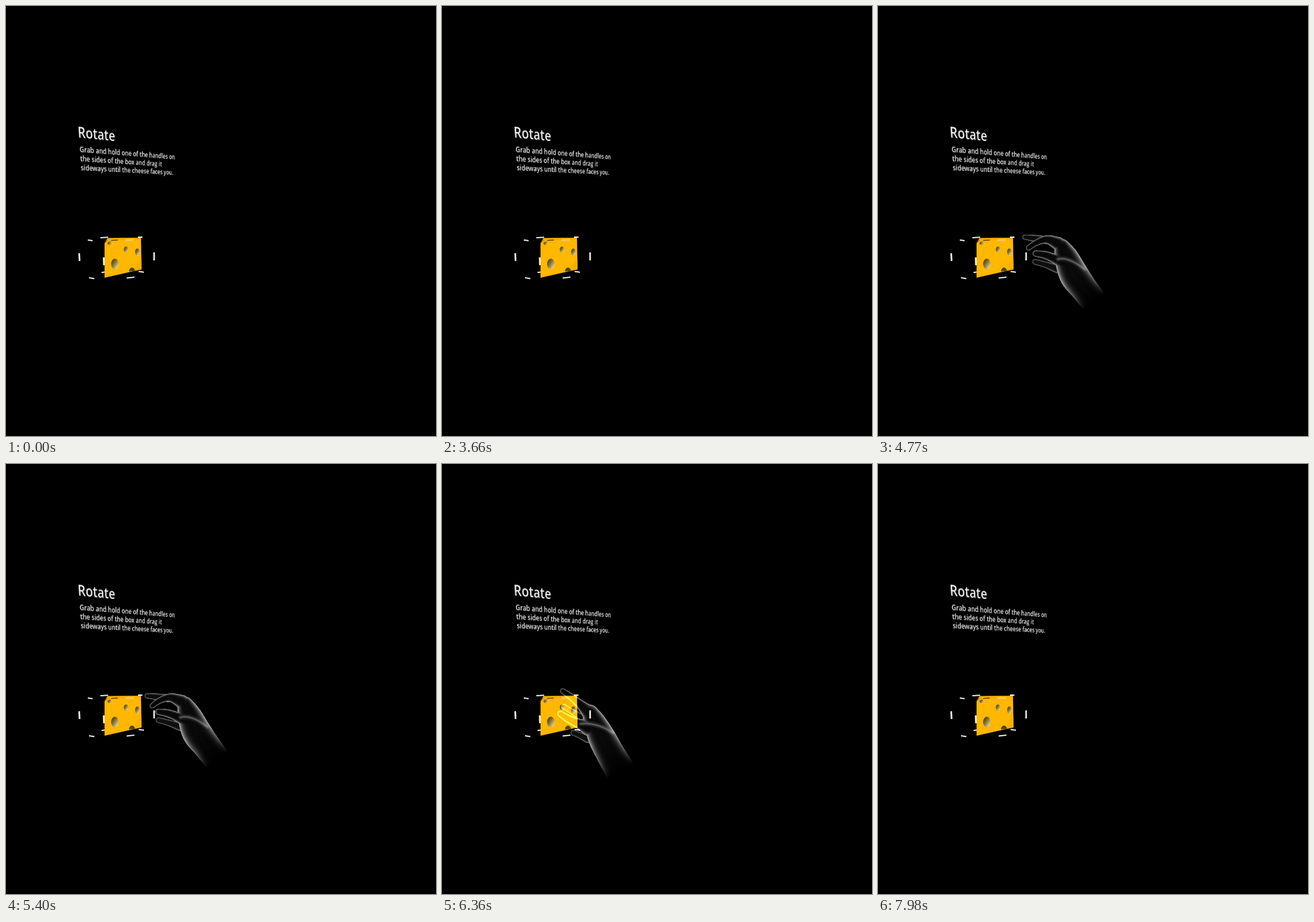
An HTML page with a canvas for the animation above (8 s loop, 720 by 720 pixels).

```html
<!DOCTYPE html>
<html lang="en">
<head>
<meta charset="utf-8">
<title>Rotate</title>
<style>
html, body { margin: 0; width: 100%; height: 100%; overflow: hidden; background: #000; }
canvas, svg { position: absolute; left: 0; top: 0; }
canvas { width: 720px; height: 720px; }
svg { overflow: visible; transform-origin: 0 0; }
text { font: 600 12px "Open Sans", "Noto Sans", sans-serif; fill: #f4f4f4; }
.title { font-size: 23px; }
</style>
</head>
<body>
<canvas id="stage" width="720" height="720"></canvas>
<svg id="panel" width="230" height="110">
  <text class="title" x="8.5" y="37">Rotate</text>
  <text x="10" y="60">Grab and hold one of the handles on</text>
  <text x="10" y="75">the sides of the box and drag it</text>
  <text x="10" y="90">sideways until the cheese faces you.</text>
</svg>
<script>
const LOOP = 8000, STEP = 30;
const ctx = document.getElementById('stage').getContext('2d');

function makeLayer() {
  const c = document.createElement('canvas');
  c.width = c.height = 720;
  return c.getContext('2d');
}

// Maps the rectangle (0,0)-(w,h) onto four corners: TL, TR, BR, BL.
function quadMatrix(w, h, [a, b, c, d]) {
  const sx = a[0] - b[0] + c[0] - d[0], sy = a[1] - b[1] + c[1] - d[1];
  const x1 = b[0] - c[0], y1 = b[1] - c[1], x2 = d[0] - c[0], y2 = d[1] - c[1];
  const det = x1 * y2 - x2 * y1;
  const g = (sx * y2 - x2 * sy) / det, k = (x1 * sy - sx * y1) / det;
  const m = [
    (b[0] - a[0] + g * b[0]) / w, (b[1] - a[1] + g * b[1]) / w, 0, g / w,
    (d[0] - a[0] + k * d[0]) / h, (d[1] - a[1] + k * d[1]) / h, 0, k / h,
    0, 0, 1, 0, a[0], a[1], 0, 1
  ];
  return `matrix3d(${m.map(v => v.toFixed(8)).join(',')})`;
}

document.getElementById('panel').style.transform =
  quadMatrix(210, 30, [[123.5, 244.5], [282, 256.8], [281, 282.8], [125.4, 275]]) +
  ' translate(-10px, -60px)';

// ---- box and cheese ----
const scene = makeLayer();

function poly(g, pts, color) {
  g.fillStyle = color;
  g.beginPath();
  pts.forEach(p => g.lineTo(...p));
  g.fill();
}

function dash(x1, y1, x2, y2, w, color = '#f2f2f2') {
  scene.strokeStyle = color;
  scene.lineWidth = w;
  scene.beginPath();
  scene.moveTo(x1, y1);
  scene.lineTo(x2, y2);
  scene.stroke();
}

function hole(x, y, rx, ry, tilt = 0) {
  const shade = scene.createLinearGradient(x - rx, y - ry * .5, x + rx, y + ry * .5);
  shade.addColorStop(0, '#4a3f14');
  shade.addColorStop(.45, '#8a7838');
  shade.addColorStop(1, '#ecd99a');
  scene.fillStyle = shade;
  scene.beginPath();
  scene.ellipse(x, y, rx, ry, tilt, 0, 7);
  scene.fill();
}

function drawScene() {
  poly(scene, [[165, 398], [170, 389], [226, 388], [227, 441], [165, 455]], '#ffb700');
  poly(scene, [[165, 397], [170, 388.5], [226, 388], [226, 390.5], [186, 393]], '#f5ad00');
  poly(scene, [[213, 443.5], [222, 428], [226.5, 424], [227, 441]], '#fbb000');
  dash(176, 392.5, 187, 391.8, 1.2, '#3d2c00');
  dash(166, 396, 170, 391.5, 1, '#7a5800');
  dash(200, 392, 214, 391.6, 2, '#f3d890');
  hole(174, 397, 4, 2.6, -.3);
  hole(201, 407.7, 3.7, 5);
  hole(220, 412, 3.8, 6);
  hole(182.3, 432, 6.3, 9);
  scene.fillStyle = '#4f471f';
  scene.beginPath();
  scene.ellipse(211, 444, 5, 6, -.1, Math.PI, 0);
  scene.fill();

  dash(137, 391.8, 145, 393, 2);
  dash(158, 388, 171, 387.2, 2);
  dash(221, 387, 228.5, 387, 2);
  dash(122.6, 414, 123.2, 427, 2.8);
  dash(248, 412.5, 248, 426, 2.6);
  dash(139, 455, 148, 456.4, 2);
  dash(202, 455.6, 215, 454.1, 2);
  dash(222, 444.6, 231, 445.8, 2);
  dash(163.6, 421, 164, 434, 2.8);
  dash(160, 446.3, 165, 445.4, 2);
}
drawScene();

// ---- hand: chains of [x, y, radius] ----
const open = {
  middle: [[291, 408, 3.5], [300, 409, 4.5], [312, 418, 6]],
  low: [[300, 437, 4], [308, 441, 4.5], [318, 446, 6]],
  index: [[295, 371, 4.2], [304, 388, 5.3], [316, 408, 7.5], [330, 426, 12]],
  thumb: [[282, 414, 5.8], [295, 420, 7], [310, 428, 8.5], [330, 438, 14]],
  palm: [[328, 428, 13], [336, 443, 18], [343, 463, 20.5], [353, 484, 22], [369, 506, 23]]
};
const reach = {
  middle: [[246, 387, 4], [262, 389, 5.5], [282, 392, 6.5]],
  low: [[263, 428.5, 4.5], [280, 433, 5], [300, 440, 7]],
  index: [[252, 405, 4.2], [266, 396, 5], [283, 391, 7], [302, 398, 11]],
  thumb: [[264, 414.5, 5], [280, 417, 6.5], [296, 423, 8], [314, 430, 13]],
  palm: [[308, 402, 12], [316, 422, 20], [328, 450, 24.5], [344, 472, 23], [362, 495, 22]]
};
const pinch = {
  middle: [[212, 400, 4], [226, 400, 4.5], [246, 400, 6]],
  low: [[240, 436, 4], [254, 440, 5], [274, 444, 7]],
  index: [[233, 410, 4], [242, 400, 5], [260, 397, 6.5], [281, 404, 13]],
  thumb: [[235, 422, 5], [250, 425, 6.5], [266, 430, 8], [286, 436, 13]],
  palm: [[284, 405, 13], [290, 426, 20], [299, 450, 25], [320, 477, 23.5], [338, 503, 24]]
};
const drag = {
  middle: [[204, 406, 4], [218, 415, 4.5], [236, 426, 6]],
  low: [[220, 450, 4.5], [230, 454, 5], [244, 460, 7]],
  index: [[202, 380, 4.3], [215, 389, 5.5], [231, 402, 7.5], [248, 418, 13]],
  thumb: [[198, 418, 5], [212, 427, 6.5], [227, 434, 8], [246, 442, 13]],
  palm: [[248, 416, 13], [257, 435, 19], [268, 459, 23], [283, 487, 24], [299, 514, 25]]
};

const keys = [
  { t: 3660, pose: open, dx: 16, dy: 8 },
  { t: 4170, pose: open, dx: 0, dy: 0 },
  { t: 4450, pose: open, dx: -4, dy: -14 },
  { t: 4770, pose: reach, dx: 0, dy: 0 },
  { t: 5260, pose: reach, dx: -5, dy: -1 },
  { t: 5820, pose: pinch, dx: 0, dy: 0 },
  { t: 6080, pose: pinch, dx: -5, dy: 0 },
  { t: 6360, pose: drag, dx: 0, dy: 0 },
  { t: 6870, pose: drag, dx: 28, dy: 20 },
  { t: 7250, pose: drag, dx: 31, dy: 20 }
];

const clamp = v => Math.max(0, Math.min(1, v));
const lerp = (a, b, k) => a + (b - a) * k;
const ease = k => k * k * (3 - 2 * k);

function poseAt(t) {
  let i = 0;
  while (i < keys.length - 2 && t >= keys[i + 1].t) i++;
  const a = keys[i], b = keys[i + 1];
  const k = ease(clamp((t - a.t) / (b.t - a.t)));
  const dx = lerp(a.dx, b.dx, k), dy = lerp(a.dy, b.dy, k);
  const pose = {};
  for (const part in a.pose) {
    pose[part] = a.pose[part].map((p, j) => {
      const q = b.pose[part][j];
      return [lerp(p[0], q[0], k) + dx, lerp(p[1], q[1], k) + dy, lerp(p[2], q[2], k)];
    });
  }
  return pose;
}

// Catmull-Rom sampling of a chain.
function smooth(chain) {
  const out = [], n = 6, last = chain.length - 1;
  for (let i = 0; i < last; i++) {
    const p0 = chain[Math.max(0, i - 1)], p1 = chain[i];
    const p2 = chain[i + 1], p3 = chain[Math.min(last, i + 2)];
    for (let j = 0; j < n; j++) {
      const u = j / n;
      out.push(p1.map((v, c) => v + .5 * u * (p2[c] - p0[c] +
        u * (2 * p0[c] - 5 * v + 4 * p2[c] - p3[c] + u * (3 * (v - p2[c]) + p3[c] - p0[c])))));
    }
  }
  out.push(chain[last]);
  return out;
}

const hand = makeLayer();

function tube(pts, scale) {
  pts.forEach(([x, y, r], i) => {
    r *= scale;
    hand.beginPath();
    hand.arc(x, y, r, 0, 7);
    hand.fill();
    if (!i) return;
    const [px, py, pr] = pts[i - 1], q = pr * scale;
    const len = Math.hypot(x - px, y - py) || 1;
    const nx = (py - y) / len, ny = (x - px) / len;
    hand.beginPath();
    hand.moveTo(px + nx * q, py + ny * q);
    hand.lineTo(x + nx * r, y + ny * r);
    hand.lineTo(x - nx * r, y - ny * r);
    hand.lineTo(px - nx * q, py - ny * q);
    hand.fill();
  });
}

// Nested insets from bright rim to dark core.
function shell(chains, rim, core) {
  const parts = chains.map(smooth), layers = 16;
  for (let i = 0; i < layers; i++) {
    const s = i / layers;
    const v = Math.round(core + (rim - core) * (1 - s) ** 4.2);
    hand.fillStyle = `rgb(${v},${v},${v})`;
    parts.forEach(p => tube(p, 1 - s * .92));
  }
}

function crease({ thumb, palm }) {
  const [x1, y1] = thumb[2], [cx, cy] = palm[1], [x2, y2] = palm[2];
  hand.lineCap = 'round';
  for (const [w, a] of [[9, .05], [6, .07], [3.5, .1], [1.5, .2]]) {
    hand.strokeStyle = `rgba(255,255,255,${a})`;
    hand.lineWidth = w;
    hand.beginPath();
    hand.moveTo(x1 + 5, y1 + 1);
    hand.quadraticCurveTo(cx + 2, cy - 3, x2 + 18, y2 - 9);
    hand.stroke();
  }
}

function drawHand(t) {
  const alpha = clamp((t - 3660) / 300) * clamp((7250 - t) / 370);
  if (!alpha) return;
  const pose = poseAt(t);
  hand.globalCompositeOperation = 'source-over';
  hand.clearRect(0, 0, 720, 720);
  shell([pose.middle], 150, 14);
  shell([pose.low], 140, 16);
  shell([pose.palm, pose.index, pose.thumb], 165, 10);
  crease(pose);

  const [, , from, , to] = pose.palm;
  const fade = hand.createLinearGradient(from[0], from[1], to[0], to[1]);
  fade.addColorStop(0, '#000');
  fade.addColorStop(.55, 'rgba(0,0,0,.55)');
  fade.addColorStop(1, 'rgba(0,0,0,0)');
  hand.globalCompositeOperation = 'destination-in';
  hand.fillStyle = fade;
  hand.fillRect(0, 0, 720, 720);

  ctx.globalAlpha = alpha;
  ctx.globalCompositeOperation = 'lighter';
  ctx.drawImage(hand.canvas, 0, 0);
  ctx.globalAlpha = 1;
  ctx.globalCompositeOperation = 'source-over';
}

let start;
function frame(now) {
  start ??= now;
  const t = Math.floor(((now - start) % LOOP) / STEP) * STEP;
  ctx.fillStyle = '#000';
  ctx.fillRect(0, 0, 720, 720);
  ctx.drawImage(scene.canvas, 0, 0);
  drawHand(t);
  requestAnimationFrame(frame);
}
requestAnimationFrame(frame);
</script>
</body>
</html>
```
